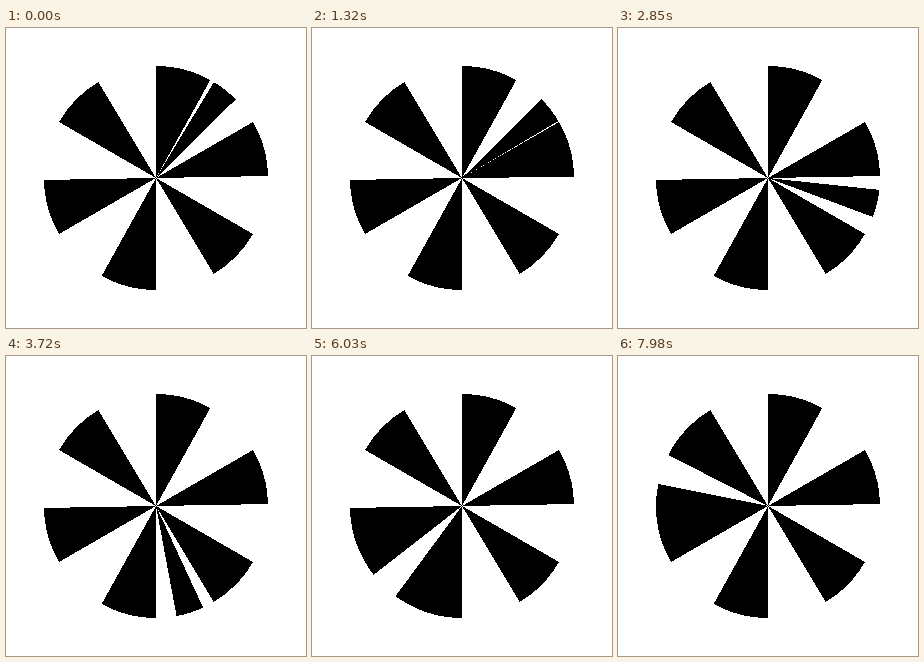
Recreate the animation shown at these times as an HTML page. Size 300 by 300 pixels, loop 8000 ms.

```html
<!DOCTYPE html>
<html lang="en">
<head>
<meta charset="utf-8">
<title>Rotating sectors</title>
<style>
  html, body { margin: 0; width: 100%; height: 100%; overflow: hidden; background: #fff; }
  svg { display: block; width: 100%; height: 100%; }
</style>
</head>
<body>
<svg viewBox="0 0 300 300" shape-rendering="crispEdges">
  <path id="fixed"/>
  <path id="moving"/>
</svg>
<script>
const CENTER = 150, RADIUS = 112;
const LOOP = 8000, STEP = 30; // one degree per 30 ms step

// Angles in degrees, clockwise from the top.
function rim(angle) {
  const a = angle * Math.PI / 180;
  return `${CENTER + RADIUS * Math.sin(a)} ${CENTER - RADIUS * Math.cos(a)}`;
}

function sector(from, to) {
  return `M${CENTER} ${CENTER}L${rim(from)}A${RADIUS} ${RADIUS} 0 0 1 ${rim(to)}Z`;
}

const fixed = document.getElementById('fixed');
const moving = document.getElementById('moving');

fixed.setAttribute('d', [0, 60, 120, 180, 240, 300].map(a => sector(a, a + 29)).join(''));

function draw() {
  const turn = Math.floor(performance.now() % LOOP / STEP);
  moving.setAttribute('d', [0, 30].map(a => sector(turn + a + 1.1, turn + a + 15.4)).join(''));
  requestAnimationFrame(draw);
}
draw();
</script>
</body>
</html>
```
